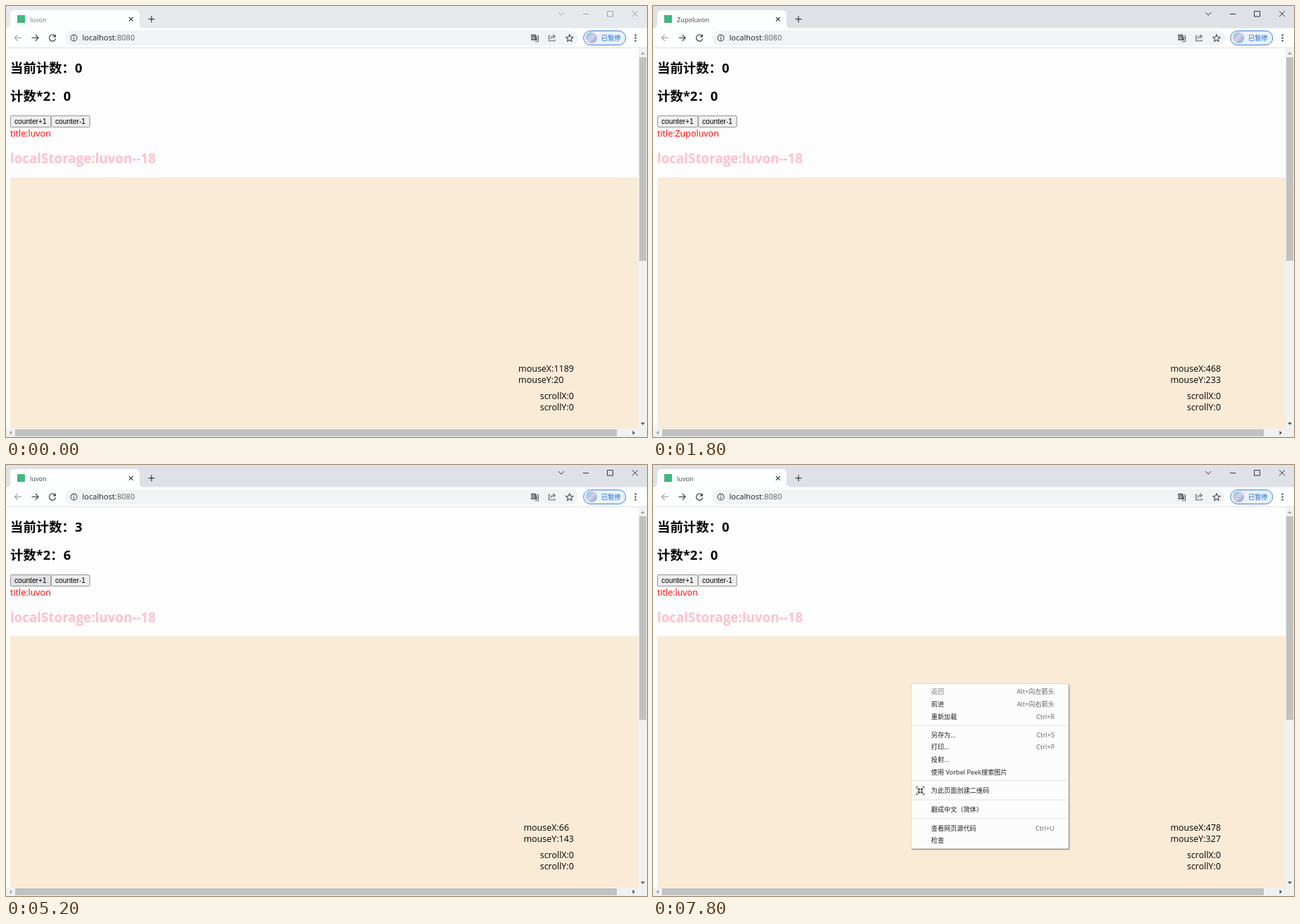
An HTML page for the animation above (8 s loop, 912 px wide and 614 px high).

```html
<!DOCTYPE html>
<html lang="zh-CN">
<head>
<meta charset="utf-8">
<title>luvon</title>
<style>
html, body { margin: 0; width: 100%; height: 100%; overflow: hidden; background: #fdfdfd; }
body, svg text { font-family: "Open Sans", "Noto Sans CJK SC", "Noto Sans CJK", sans-serif; }
svg { position: absolute; left: 0; top: 0; display: block; }
svg text { white-space: pre; }
.info { position: absolute; right: calc(100% - 808px); font-size: 12.5px; line-height: 16px; white-space: pre; color: #000; }
.h { font-size: 18.4px; font-weight: 700; }
.ui { font-size: 9.2px; }
.btn text { font: 10.2px "Liberation Sans", Arial, sans-serif; }
.btn rect { stroke: #767676; stroke-width: .8; }
.line { fill: none; stroke-width: 1.3; }
.keys { fill: #5f6368; text-anchor: end; }
</style>
</head>
<body>
<svg width="912" height="614" viewBox="0 0 912 614">
  <rect width="912" height="614" fill="#fdfdfd"/>

  <!-- page -->
  <text class="h" x="6" y="95" id="count"></text>
  <text class="h" x="6" y="135" id="double"></text>
  <g class="btn" id="plus"><rect x="6.4" y="156.4" width="57.6" height="16.2" rx="1.8"/><text x="12" y="168">counter+1</text></g>
  <g class="btn" id="minus"><rect x="64.4" y="156.4" width="54.8" height="16.2" rx="1.8"/><text x="70" y="168">counter-1</text></g>
  <text x="6" y="185.5" font-size="12.5" fill="#f00" id="title"></text>
  <text x="6" y="224" font-size="18.8" font-weight="700" fill="#ffc0cb">localStorage:luvon--18</text>
  <rect x="6" y="244" width="894" height="358" fill="#faebd7"/>

  <!-- scrollbars -->
  <path d="M900 60h12v554H0v-12h900z" fill="#f0f2f2"/>
  <path d="M901 73h10v290h-10zM13 603h856v10H13z" fill="#c1c1c1"/>
  <path d="M903 69l3-3.6 3 3.6zM8 605l-3.4 3 3.4 3z" fill="#a3a3a3"/>
  <path d="M903 593.5l3 3.6 3-3.6zM891.5 605l3.4 3-3.4 3z" fill="#505050"/>

  <!-- window frame -->
  <rect width="912" height="32" id="frame"/>
  <path d="M0 31.5Q6 31.5 6 25.5V12q0-6 6-6H184q6 0 6 6v13.500q0 6 6 6H912V60H0z" fill="#fdfefe"/>
  <path d="M0 59.5H912" stroke="#dfe2e4"/>
  <rect x="16" y="13" width="11" height="11" fill="#41b883" id="favicon"/>
  <path class="line" d="M22 13.500a5 5 0 1 1-5 5" stroke="#5f6368" id="spinner"/>
  <text class="ui" x="34" y="22.500" id="tab"></text>
  <path class="line" d="M175 16l5.600 5.600M180.600 16l-5.600 5.600M202.500 18.700h9M207 14.200v9" stroke="#3c4043"/>
  <g class="line" id="controls" style="stroke-width:1">
    <path d="M786 9l4 4 4-4M821 11.500h8M855.500 7.500h8v7.500h-8zM891 7.300l8 7.800M899 7.300l-8 7.800"/>
  </g>

  <!-- toolbar -->
  <circle cx="41" cy="45.500" r="9" fill="#e3e5e7" id="forward"/>
  <path class="line" d="M22 45.300H12.500M16.800 40.900l-4.400 4.400 4.400 4.400" stroke="#a6a9ac"/>
  <path class="line" d="M36.500 45.300H46M41.700 40.900l4.400 4.400-4.400 4.400" stroke="#4a4d51"/>
  <g id="reload">
    <path class="line" d="M69.800 42.800a4.600 4.600 0 1 0 .8 3.500" stroke="#4a4d51"/>
    <path d="M71 40v4.600h-4.600z" fill="#4a4d51"/>
  </g>
  <path class="line" d="M62 41.500l8 8M70 41.500l-8 8" stroke="#4a4d51" id="stop"/>
  <rect x="84" y="35" width="730" height="21" rx="10.500" fill="#f0f4f4"/>
  <circle class="line" cx="96.500" cy="45.500" r="4.400" stroke="#4a4d51" style="stroke-width:1.100"/>
  <path d="M96 42.800h1.100v1.200H96zM96 45h1.100v3.200H96z" fill="#4a4d51"/>
  <text x="108.500" y="49.300" font-size="11.100" fill="#202124">localhost<tspan fill="#5f6368">:8080</tspan></text>

  <rect x="740.500" y="36.800" width="24" height="18.400" rx="9.200" fill="#bfc1c3" id="lit"/>
  <path d="M748 40.500h5.500l2.800 8.500H748q-1 0-1-1v-6.500q0-1 1-1z" fill="#5f6368"/>
  <path class="line" d="M754.500 42.500h3v8.300h-5M754.500 45.500h2.600" stroke="#5f6368" style="stroke-width:1"/>
  <path class="line" d="M751.600 43.600a2 2 0 1 0 .5 1.600h-1.700" stroke="#fff" style="stroke-width:.8"/>
  <path class="line" d="M774.500 42.300h-2v7.500h8.500v-2M774.800 47.300q.5-4 5-4M778 40.800l3.400 2.500-3.400 2.600" stroke="#5f6368" style="stroke-width:1.100"/>
  <path class="line" d="M801.800 40.700l1.500 3.300 3.600.4-2.700 2.400.8 3.600-3.200-1.900-3.200 1.900.8-3.600-2.700-2.400 3.600-.4z" stroke="#4a4d51" style="stroke-width:1.100"/>
  <defs><linearGradient id="sky" x2="1" y2="1">
    <stop stop-color="#6fc3c9"/><stop offset=".5" stop-color="#d9cfea"/><stop offset="1" stop-color="#7b9cc4"/>
  </linearGradient></defs>
  <rect x="821.700" y="35.500" width="60" height="20" rx="10" fill="#e9f1fd" stroke="#3d7fe0"/>
  <circle cx="833" cy="45.200" r="8" fill="url(#sky)"/>
  <text class="ui" x="847" y="49.300" fill="#1967d2">已暂停</text>
  <g fill="#4a4d51"><circle cx="895.700" cy="41.500" r="1.200"/><circle cx="895.700" cy="45.500" r="1.200"/><circle cx="895.700" cy="49.500" r="1.200"/></g>

  <!-- translation bubble -->
  <g id="bubble">
    <rect x="608.500" y="58" width="207" height="74.500" rx="5" fill="#000" opacity=".05"/>
    <rect x="610.500" y="58.500" width="202" height="71" rx="4" fill="#000" opacity=".16"/>
    <rect x="611.500" y="59.500" width="200" height="68.500" rx="3" fill="#fff"/>
    <path d="M611.500 93h200v32q0 3-3 3h-194q-3 0-3-3z" fill="#f5f7f7"/>
    <path d="M611.500 92.700h200" stroke="#e3e5e7"/>
    <text class="ui" x="638" y="78.500" fill="#1a73e8">英语</text>
    <path d="M623 86h48" stroke="#1a73e8" stroke-width="1.500"/>
    <text class="ui" x="685" y="78.500" fill="#5f6368">中文（简体）</text>
    <g fill="#5f6368"><circle cx="770" cy="71" r="1.100"/><circle cx="770" cy="74.700" r="1.100"/><circle cx="770" cy="78.400" r="1.100"/></g>
    <path class="line" d="M790.800 71.500l6.400 6.400M797.200 71.500l-6.400 6.400" stroke="#5f6368"/>
    <text x="623" y="113.500" font-size="8.700" fill="#80868b"><tspan font-weight="600">Vorbel</tspan> Translate</text>
  </g>
</svg>
<div class="info" style="top:509px" id="mouse"></div>
<div class="info" style="top:547.500px">scrollX:0
scrollY:0</div>
<svg width="912" height="614" viewBox="0 0 912 614">
  <g id="menu">
    <rect x="2.500" y="2.500" width="224" height="235" fill="#000" opacity=".18"/>
    <rect x="1.200" y="1.200" width="224.300" height="235.300" fill="#000" opacity=".4"/>
    <rect x=".5" y=".5" width="224" height="235" fill="#fcfcfc" stroke="#d4d4d4" stroke-width=".8"/>
    <rect x="1" width="223" height="17.600" fill="#e8e8e9" id="hover"/>
    <path d="M1 60h223M1 138.500h223M1 166h223M1 192.500h223" stroke="#e2e3e5"/>
    <path class="line" d="M8 150v-2.500h2.500M16.500 147.500H19v2.500M19 156v2.500h-2.500M10.500 158.500H8V156" stroke="#4a4d51" style="stroke-width:1"/>
    <path d="M10 149.500h3v3h-3zM14.200 149.500h3v3h-3zM10 153.700h3v3h-3zM14.200 153.700h3v3h-3z" fill="#4a4d51"/>
  </g>
</svg>
<script>
const $ = id => document.getElementById(id);
const LOOP = 8000, STEP = 100, ZOOM = 0.767, PAGE_TOP = 60;
const SHORT = 'luvon', LONG = 'Zupoluvon';

// label, centre line, shortcut
const items = [
  ['返回', 12, 'Alt+向左箭头'], ['前进', 30, 'Alt+向右箭头'], ['重新加载', 48, 'Ctrl+R'],
  ['另存为...', 73.5, 'Ctrl+S'], ['打印...', 91, 'Ctrl+P'], ['投射...', 109],
  ['使用 Vorbel Peek搜索图片', 126.5], ['为此页面创建二维码', 153],
  ['翻成中文（简体）', 180], ['查看网页源代码', 206.5, 'Ctrl+U'], ['检查', 224]
];

// time, page x, page y
const path = [
  [0, 1189, 20], [500, 659, 188], [1200, 659, 188], [1300, 722, 255],
  [1400, 0, 0], [1500, 0, 0], [1600, 700, 251], [2100, 120, 205], [2400, 120, 205],
  [2500, 83, 163], [2800, 78, 172], [2900, 78, 172], [3000, 62, 96], [3300, 54, 2],
  [3400, 54, 2], [3500, 54, 20], [4000, 66, 143], [5500, 66, 143], [5900, 118, 140],
  [6000, 118, 140], [6200, 116, 141], [6800, 116, 141], [7200, 136, 154], [7700, 478, 327]
];
const counts = [[0, 0], [4300, 1], [4800, 2], [5200, 3], [6200, 2], [6500, 1], [6900, 0]];
const presses = [[4200, 4300], [4600, 4800], [5100, 5200], [6100, 6200]];
const fade = [[0, 0], [1800, 0], [2100, 1], [2400, 1], [2500, .55], [2600, .2], [2700, 0]];

function addText(x, y, text, cls, fill) {
  const el = document.createElementNS('http://www.w3.org/2000/svg', 'text');
  el.setAttribute('x', x);
  el.setAttribute('y', y);
  el.setAttribute('class', cls);
  if (fill) el.setAttribute('fill', fill);
  el.textContent = text;
  $('menu').append(el);
}
items.forEach(([label, y, keys], i) => {
  addText(29, y + 3.4, label, 'ui', i ? '#202124' : '#75787c');
  if (keys) addText(204.5, y + 3.4, keys, 'ui keys');
});

const within = (t, a, b) => t >= a && t < b;
const show = (id, on) => { $(id).style.display = on ? '' : 'none'; };
const text = (id, s) => { if ($(id).textContent !== s) $(id).textContent = s; };
const held = (table, t) => table.filter(k => k[0] <= t).pop()[1];

function tween(table, t) {
  const i = table.findIndex(k => k[0] > t);
  if (i < 0) return table[table.length - 1].slice(1);
  const a = table[i - 1], b = table[i];
  const p = (t - a[0]) / (b[0] - a[0]);
  return a.slice(1).map((v, n) => v + (b[n + 1] - v) * p);
}

function paintButton(id, left, right, x, y, pressed) {
  const over = x > left && x < right && y > 156 && y < 173;
  $(id).firstElementChild.setAttribute('fill', !over ? '#efefef' : pressed ? '#f5f5f5' : '#e2e3e4');
}

function draw(t) {
  const [mx, my] = tween(path, t).map(Math.round);
  text('mouse', `mouseX:${mx}\nmouseY:${my}`);

  const n = held(counts, t);
  text('count', '当前计数：' + n);
  text('double', '计数*2：' + n * 2);
  const name = within(t, 1600, 3500) ? LONG : SHORT;
  text('title', 'title:' + name);
  text('tab', name);

  const px = mx * ZOOM, py = my * ZOOM + PAGE_TOP;
  const pressed = presses.some(([a, b]) => within(t, a, b));
  paintButton('plus', 6, 64, px, py, pressed);
  paintButton('minus', 64, 119, px, py, pressed);

  const active = t >= 500;
  $('frame').setAttribute('fill', active ? '#dee1e6' : '#e7eaed');
  $('tab').setAttribute('fill', active ? '#3c4043' : '#73777b');
  $('controls').setAttribute('stroke', active ? '#303236' : '#a0a3a6');

  const loading = within(t, 1400, 1600);
  show('favicon', !loading);
  show('spinner', loading);
  show('reload', !loading);
  show('stop', loading);
  show('forward', within(t, 3300, 3500));
  show('lit', within(t, 1900, 3000));
  $('bubble').setAttribute('opacity', tween(fade, t)[0]);

  const first = within(t, 600, 1300);
  show('menu', first || t >= 7800);
  $('menu').setAttribute('transform', first ? 'translate(505 204.5)' : 'translate(366.700 311)');
  show('hover', within(t, 900, 1300));
  $('hover').setAttribute('y', t < 1000 ? 21 : 39);
}

const start = performance.now();
function tick() {
  const t = (performance.now() - start) % LOOP;
  draw(Math.floor(t / STEP) * STEP);
  requestAnimationFrame(tick);
}
tick();
</script>
</body>
</html>
```
